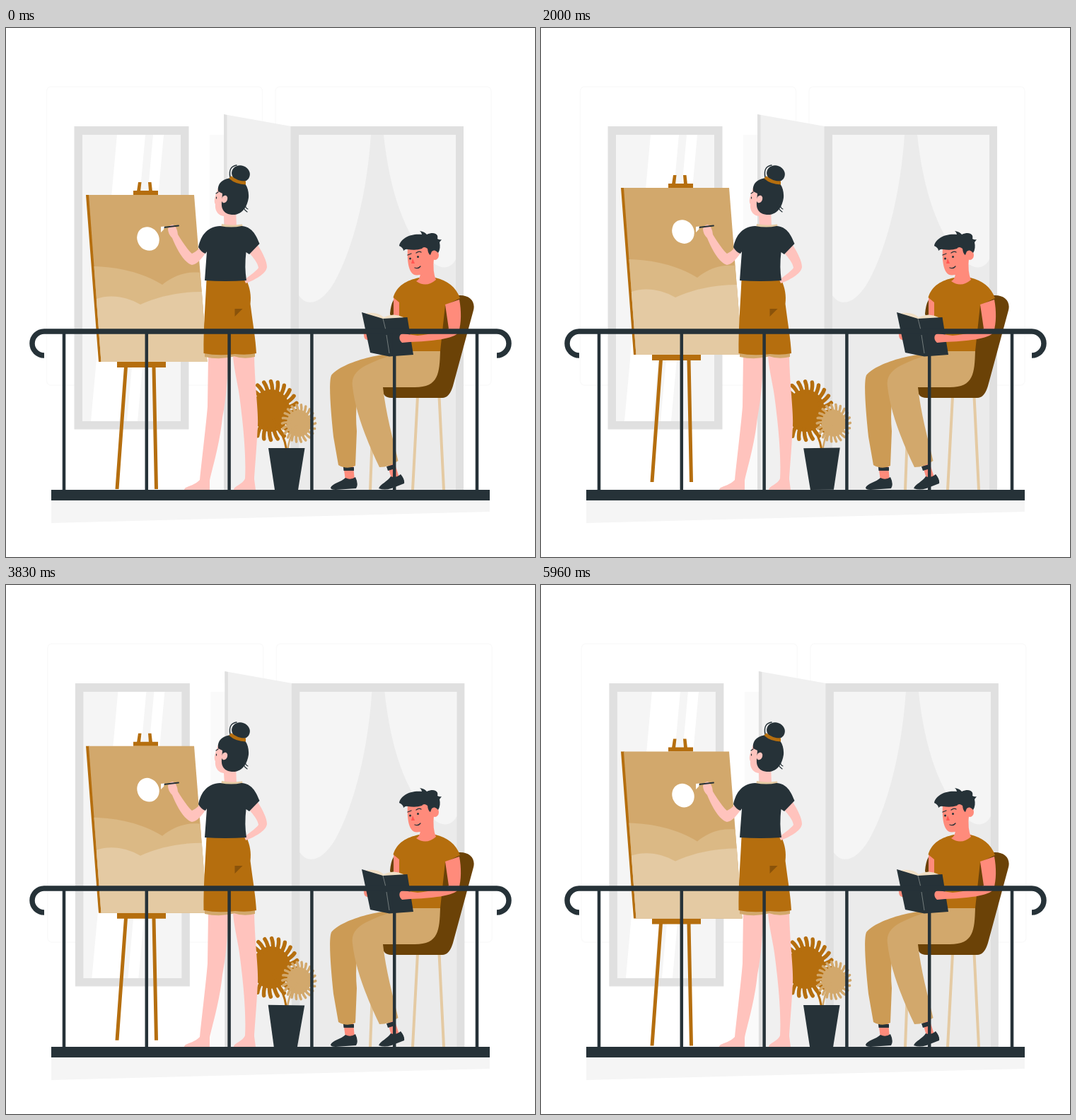
Animation of 748x748 px, one loop 6 s. Source, as an HTML page:

```html
<!DOCTYPE html>
<html lang="en">
<head>
<meta charset="utf-8">
<title>Balcony afternoon</title>
<style>
  html, body { margin: 0; width: 100%; height: 100%; overflow: hidden; background: #fff; }
  svg { display: block; width: 100vw; height: 100vh; }
  .ink { fill: #263238; }
  .brown { fill: #b56e0e; }
  .tan { fill: #d2a86c; }
  .pale { fill: #ffc3bd; }
  .warm { fill: #ff8b7b; }
  .frame { fill: #e0e0e0; }
  .line { fill: none; stroke: #263238; stroke-linecap: round; }
</style>
</head>
<body>
<svg viewBox="0 0 748 748">
  <g id="house">
    <g fill="#fff" stroke="#fafafa" stroke-width="1.5">
      <rect x="57.5" y="83" width="305" height="422" rx="6"/>
      <rect x="381" y="83" width="305" height="422" rx="6"/>
    </g>
    <path class="frame" d="M96.5 139H258.5V567.500H96.500Z"/>
    <path fill="#f5f5f5" d="M108 151H247V556H108Z"/>
    <path fill="#fff" d="M157 151H197L160 556H120ZM208 151H223L186 556H171Z"/>
    <path fill="#fafafa" d="M288 151H309V653H288Z"/>
    <path fill="#f0f0f0" d="M308 122L403 139V653H308Z"/>
    <path class="frame" d="M308 122L312.500 123V653H308ZM402.500 139H647V653H402.500Z"/>
    <path fill="#ebebeb" d="M414 151H636V653H414Z"/>
    <path fill="#f5f5f5" d="M414 151H516C510 240 488 318 464 360C447 389 426 396 414 378ZM534 151H636V327C629 341 615 342 603 331C566 300 543 235 534 151Z"/>
  </g>

  <path fill="#f5f5f5" d="M64 667H684V684L64 700Z"/>

  <g id="plant">
    <g id="bigLeaf" class="brown" stroke="#b56e0e"></g>
    <path fill="none" stroke="#b56e0e" stroke-width="3" d="M376 550Q393 572 397 598"/>
    <g id="smallLeaf" class="tan" stroke="#d2a86c"></g>
    <path fill="none" stroke="#d2a86c" stroke-width="2.500" d="M412 562Q401 574 398 598"/>
    <path class="ink" d="M371 594H422.500L413 653H380Z"/>
  </g>

  <g id="easel">
    <path class="brown" d="M187 218H191.500L190 231H185ZM201 218H205.500L207 231H202ZM180 230H215V236H180ZM167 479H172L159.500 652H154.500ZM206.500 479H211.500L215 652H210ZM157 472H226V480H157ZM113 236H118L135 472H131Z"/>
    <path class="tan" d="M117 236H266L284.500 472H134.500Z"/>
    <path fill="#dbb985" d="M124.500 337C158 338 192 345 221 363C237 350 254 344 274.500 346L284.500 472H134.500Z"/>
    <path fill="#e4caa3" d="M127.800 383C148 376 171 380 190 391C216 379 246 373 277 373L284.500 472H134.500Z"/>
    <ellipse fill="#fff" cx="201" cy="298" rx="15.300" ry="17.200" transform="rotate(-28 201 298)"/>
  </g>

  <g id="painter">
    <path class="pale" d="M286 464H315C313 500 311 525 306 551C302 590 291 625 288 640L288 653H252C252 648 266 648 274 639C277 610 283 560 285 535ZM321 464H351C352 510 357 540 356 562C354 600 352 620 351 638L353 653H322C322 648 335 645 338 637C340 600 334 550 330 520C327 500 322 480 321 464Z"/>
    <path class="tan" d="M281 459H324V464Q303 470 281 465ZM322 459H352V465Q336 469 322 464Z"/>
    <path class="brown" d="M283.500 356H340C345 368 347 378 345.500 390C349 418 353 440 354 460Q340 463 324 461Q300 464 279.500 460C279 425 282 390 283.500 356Z"/>
    <path fill="#8a530a" d="M323.500 397H334.500L323.500 408Z"/>
    <path class="pale" d="M344 318L356 307C363 318 369 330 369 338C368 348 350 357 339 361L337 356C345 350 356 342 357 339C356 332 350 325 344 318Z"/>
    <path class="pale" d="M284 316C277 325 271 334 263 335C252 332 242 314 235 297Q229 291 229 284Q231 278 236 278Q242 281 243 292C250 304 259 316 263 319C268 317 273 312 277 307Z"/>
    <path class="line" stroke-width="1.800" d="M223 282L244 279.500"/>
    <path fill="#fff" d="M219 281L224 280.500L223 285L219 289Z"/>
    <path class="pale" d="M300 226C296 237 293 245 296 249C295 257 299 265 308 266L309 282H326L325 255L320 226Z"/>
    <path fill="#e4caa3" d="M305 277Q320 280 334 277.500L335 283H304Z"/>
    <path class="ink" d="M303 280Q319 283 333 280C347 281 353 291 358.500 305L344 320L339.500 317Q337 338 340 357Q310 359 281 357L284 316L282 319Q276 317 272 310C276 292 285 281 303 280Z"/>
    <path class="ink" d="M300 231C298 217 311 211 324 212C338 215 344 226 343 240C341 255 332 265 319 264C309 263 304 257 305 246L306 234Z"/>
    <ellipse class="pale" cx="309" cy="242" rx="4" ry="5.500" transform="rotate(20 309 242)"/>
    <path class="line" stroke-width="1.200" d="M335 251Q336 257 341 260M338 251Q339 255 342 256M297 234L300 232M297.500 239V241"/>
    <ellipse class="ink" cx="332" cy="206" rx="13" ry="11.500" transform="rotate(20 332 206)"/>
    <path class="line" stroke-width="1.500" d="M317 211Q314 196 326 194"/>
    <path fill="none" stroke="#b56e0e" stroke-width="5" d="M317 211Q326 219 339 219"/>
  </g>

  <g id="reader">
    <path fill="none" stroke="#e4caa3" stroke-width="4" d="M520 521L515 653M582 521L575 653M612.500 521L619 653"/>
    <path fill="#6b4207" d="M558 378H642C656 378 664 387 661 399L632 506Q627 523 617 523H545Q532 523 531.500 508L570 500L543 404Q545 379 558 378Z"/>
    <path class="warm" d="M477 618H491L493 640H480ZM539 616L549 614L557 638L546 641Z"/>
    <path class="ink" d="M477 621H492V626H477.500ZM538 620L549 617L550.500 623L540 626ZM459 650C461 644 474 642 480 636Q487 640 494 635Q499 645 495 651L466 653Q459 653 459 650ZM527 651C529 645 540 641 544 634Q551 637 558 631Q564 638 563 644L545 651Q535 654 527 651Z"/>
    <path fill="#cc9b55" d="M550 460C515 462 472 476 460 491C456 501 459 540 463 578L470 618Q482 625 494 619L496 570Q492 525 505 493L565 470Z"/>
    <path class="tan" d="M614 456C613 488 612 508 578 508H533C537 545 547 580 554.500 612Q542 621 528 621C513 590 494 545 490 507C487 488 503 479 520 472C541 463 555 459 575 456Z"/>
    <path class="warm" d="M548 382L558 386L556 412H548Z"/>
    <path class="brown" d="M584 353C566 357 553 364 547.500 381L556 388L556 457H614L621 392L642 382C636 366 624 357 607 353Z"/>
    <path class="warm" d="M586 340L605 325Q603 345 608 356Q594 368 580 358Q587 355 586 340Z"/>
    <path class="warm" d="M568 310C567 326 568 350 581 349.500C593 349 602 339 605 326L604 306Z"/>
    <ellipse class="warm" cx="606.500" cy="321" rx="5.500" ry="7"/>
    <path class="ink" d="M556 308C558 297 573 290 588 292Q588 289 585 287Q592 288 595 292C606 287 612 292 610 298Q613 300 616 299L613 303Q615 312 611 318Q606 312 602 316L600 321Q597 320 596 312Q591 308 588 312Q580 315 568 313Q565 312 562 315Q562 311 556 308Z"/>
    <g class="line" stroke-width="1.300">
      <path d="M568 321L573 319M580 318Q584 315 587 317M578 339Q583 341 586 337"/>
    </g>
    <circle class="ink" cx="571.500" cy="326" r="1.500"/>
    <circle class="ink" cx="582.500" cy="323.500" r="1.500"/>
    <path fill="#ff5652" d="M575 326L573 333L578 333Z"/>
    <path class="warm" d="M506 434Q505 429 512 430L517 441Q506 443 506 434Z"/>
    <path fill="#f0dfc5" d="M507 404Q524 400 534 409Q548 402 562 409L558 417H515Z"/>
    <path class="ink" d="M503 402L533 411L567.500 409L576 462L542 464.500L515 459Z"/>
    <path fill="none" stroke="#87908f" stroke-width=".8" d="M533 411L537 427M538 434L542 460"/>
    <path class="warm" d="M621 391L641 384C644 400 644 417 640 430C634 440 600 443 571 444L560 445C555 441 555 433 561 432L582 435C600 433 616 430 626 425Z"/>
  </g>

  <g id="railing">
    <path class="ink" d="M64 653H684V668H64Z"/>
    <path class="line" style="stroke-linecap:butt" stroke-width="7.500" d="M54 463A17 17 0 0 1 54 429H694A17 17 0 0 1 694 463"/>
    <path id="posts" class="line" stroke-width="4.500"/>
  </g>
</svg>
<script>
const LOOP = 6000, UNIT = 748 / 500;
const el = id => document.getElementById(id);

// A round leaf whose rim is split into fingers.
function drawLeaf(id, cx, cy, rx, ry, count, width) {
  let fingers = '';
  for (let i = 0; i < count; i++) {
    const a = i / count * Math.PI * 2, bend = a + 0.16;
    const at = (k, b) => `${cx + Math.cos(b) * rx * k} ${cy + Math.sin(b) * ry * k}`;
    fingers += `M${cx} ${cy}Q${at(0.7, bend)} ${at(0.94, a)}`;
  }
  el(id).innerHTML = `<ellipse cx="${cx}" cy="${cy}" rx="${rx * 0.68}" ry="${ry * 0.68}" stroke="none"/>
    <path d="${fingers}" fill="none" stroke-width="${width}" stroke-linecap="round"/>`;
}
drawLeaf('bigLeaf', 374.5, 541, 40, 44, 24, 5.5);
drawLeaf('smallLeaf', 414, 559, 25, 28, 22, 3.6);
el('posts').setAttribute('d', Array.from({ length: 6 }, (_, i) => `M${82 + i * 116.8} 431V655`).join(''));

// Linear interpolation through [time fraction, value] stops.
function track(stops, p) {
  const i = Math.max(1, stops.findIndex(s => s[0] >= p));
  const [t0, v0] = stops[i - 1], [t1, v1] = stops[i];
  return v0 + (v1 - v0) * (p - t0) / (t1 - t0);
}
const shake = [0, -1, 2, -4, 4, -4, 4, -4, 2, -1, 0].map((v, i) => [i / 10, v]);
const float = [[0, 0], [0.5, -10], [1, 0]];
const sway = [[0, 0], [0.25, 1], [0.75, -1], [1, 0]];

function render(ms) {
  const slow = ms % LOOP / LOOP, fast = ms % (LOOP / 2) / (LOOP / 2);
  el('house').setAttribute('transform', `translate(${track(shake, slow) * UNIT} 0)`);
  el('easel').setAttribute('transform', `translate(0 ${track(float, fast) * UNIT})`);
  el('plant').setAttribute('transform', `rotate(${track(sway, fast)} 386 575)`);
}
const start = performance.now();
function tick() {
  render(performance.now() - start);
  requestAnimationFrame(tick);
}
tick();
</script>
</body>
</html>
```
